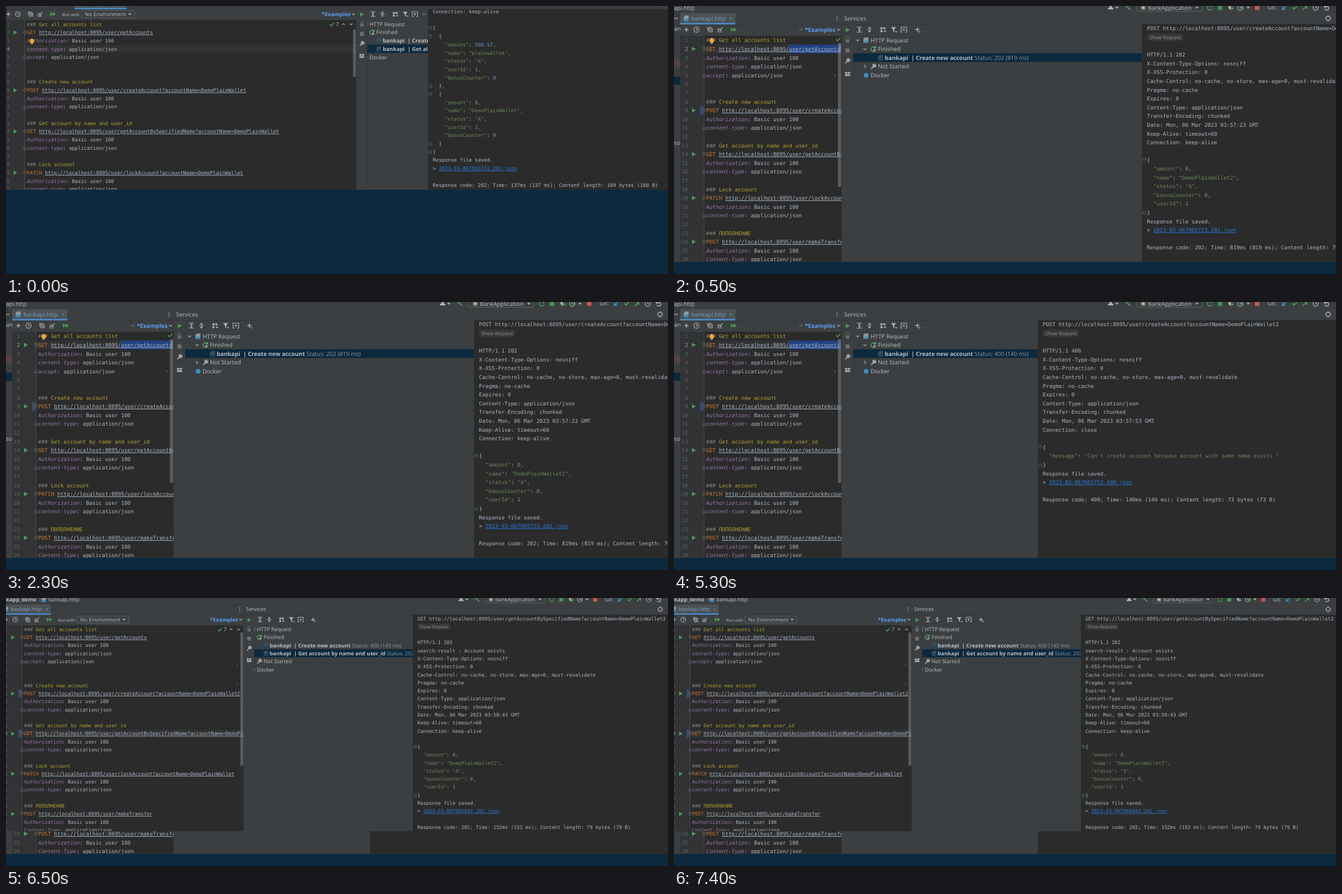
Recreate the animation shown at these times as an HTML page. Size 1175 by 477 pixels, loop 8000 ms.

```html
<!DOCTYPE html>
<html lang="en">
<head>
<meta charset="utf-8">
<style>
html, body { margin: 0; width: 100%; height: 100%; overflow: hidden; background: #0c293e; }
#stage { display: block; width: 1175px; height: 477px; }
text { white-space: pre; text-rendering: geometricPrecision; }
.m { font: 9.42px "DejaVu Sans Mono", monospace; }
.u { font: 10.25px "Open Sans", sans-serif; }
.b { font-weight: 700; }
.l { text-decoration: underline; text-underline-offset: 1.3px; }
</style>
</head>
<body>
<svg id="stage" viewBox="0 0 1175 477"></svg>
<script>
const W = 1175, ROW = 15.6;
const C = {
  bg: '#2b2b2b', gutter: '#313335', panel: '#3c3f41', edge: '#323334', navy: '#0c293e',
  text: '#a9b7c6', ui: '#bbbdbf', icon: '#afb1b3', dim: '#6a6d70', green: '#499c54',
  blue: '#4a88c7', orange: '#cc7832', str: '#6a8759', num: '#6897bb', key: '#9876aa',
  title: '#aea52c', link: '#287bde', grey: '#808080'
};

const esc = s => s.replace(/&/g, '&amp;').replace(/</g, '&lt;').replace(/>/g, '&gt;');
const rect = (x, y, w, h, fill, more = '') =>
  `<rect x="${x}" y="${y}" width="${w}" height="${h}" fill="${fill}" ${more}/>`;
const line = (x, y, d, color = C.icon, w = 1.2) =>
  `<path transform="translate(${x} ${y})" d="${d}" fill="none" stroke="${color}" stroke-width="${w}"/>`;
const solid = (x, y, d, color = C.icon) =>
  `<path transform="translate(${x} ${y})" d="${d}" fill="${color}"/>`;
const dot = (x, y, r, fill) => `<circle cx="${x}" cy="${y}" r="${r}" fill="${fill}"/>`;
const ring = (x, y, r, color = C.icon) =>
  `<circle cx="${x}" cy="${y}" r="${r}" fill="none" stroke="${color}" stroke-width="1.2"/>`;
const span = (s, fill, more = '') => `<tspan fill="${fill}" ${more}>${esc(s)}</tspan>`;
const mono = (x, y, body, more = '') =>
  `<text class="m" x="${x}" y="${y + 3.3}" fill="${C.text}" ${more}>${body}</text>`;
const ui = (x, y, s, fill = C.ui, more = '', cls = '') =>
  `<text class="u ${cls}" x="${x}" y="${y + 3.6}" fill="${fill}" ${more}>${esc(s)}</text>`;
const under = 'class="l"';

// A clipped column of the window whose content is in unscaled units
const pane = (o, l, r, dx, body, top = 0) =>
  `<svg x="${l}" y="${top}" width="${r - l}" height="${o.h - top}">` +
  `<g transform="translate(${dx - l} ${o.dy - top}) scale(${o.u})">${body}</g></svg>`;

const D = {
  plus: 'M-3.7 0h7.4M0-3.7v7.4',
  down: 'M-2.6-1.3L0 1.3 2.6-1.3',
  up: 'M-2.6 1.3L0-1.3 2.6 1.3',
  right: 'M-1.3-2.6L1.3 0-1.3 2.6',
  play: 'M-3-4L4 0-3 4z',
  drop: 'M-3-1.5h6L0 2z',
  check: 'M-4 0l3 3 5-6',
  cross: 'M-2-2l4 4M2-2l-4 4',
  wrench: 'M-4 4L1-1M4.2-2.4A2.6 2.6 0 1 1 2-4.4L1.3-1.5z',
  redo: 'M3.5-2.4A4.2 4.2 0 1 0 4.2 1M4-5v3H1',
  more: 'M-3-1.8L-1.2 0-3 1.8M.4-1.8L2.2 0 .4 1.8'
};

const clock = (x, y, c) => ring(x, y, 4.6, c) + line(x, y, 'M0-2.6V.4H2.4', c);
const fileIcon = (x, y, dim) =>
  solid(x, y, 'M-2-5h6v6h-9v-3z', dim ? '#3a4f5f' : '#8d979e') + rect(x - 5, y + 1, 9, 4, dim ? '#234761' : '#3f86b5');
const wrench = (x, y) => line(x, y, D.wrench, C.icon, 1.7);
const fold = (x, y, end) =>
  line(x, y, end ? 'M-2.5 3v-4L0-3l2.5 2v4zM-1.2 .8h2.4' : 'M-2.5-3v4L0 3l2.5-2v-4zM-1.2-.8h2.4', '#66696b', .8);
const bulb = (x, y) => dot(x, y - .8, 4.2, '#f0a732') + rect(x - 1.8, y + 3.2, 3.6, 2, '#a9a9a9');

const host = 'http://localhost:8095/user/';
const auth = 'Authorization: Basic user 100', type = 'content-type: application/json';
const doc = n => [
  '### Get all accounts list', 'GET ' + host + 'getAccounts', auth, type, 'accept: application/json', '', '',
  '### Create new account', `POST ${host}createAccount?accountName=DemoPlainWallet${n}`, auth, type, '',
  '### Get account by name and user_id', `GET ${host}getAccountBySpecifiedName?accountName=DemoPlainWallet${n}`, auth, type, '',
  '### Lock account', `PATCH ${host}lockAccount?accountName=DemoPlainWallet`, auth, type, '',
  '### ПОПОЛНЕНИЕ', `POST ${host}makeTransfer`, auth, 'Content-Type: application/json'
];

function paint(s) {
  if (s.startsWith('###')) return span('### ', C.grey) + span(s.slice(4), C.title);
  const [head, ...rest] = s.split(' ');
  const tail = rest.join(' ');
  if (tail.startsWith('http')) return span(head + ' ', C.orange) + span(tail, C.text, under);
  return span(head.slice(0, -1), C.key, 'font-style="italic"') + span(head.slice(-1) + ' ' + tail, C.text);
}

function editor(o) {
  const R = (o.right - o.edx) / o.u, end = R + 2, narrow = R < 300;
  let s = rect(11, 53, end, 500, C.bg) + rect(11, 53, 42, 500, C.gutter);
  s += rect(53, 61 + ROW * (o.caret - 1) - 7.8, end, ROW, '#323232');
  s += rect(52.8, 53, .9, 500, '#4d4f51');
  (o.marks || []).forEach(n => s += rect(46, 61 + ROW * (n - 1) - 7.8, 6.5, ROW, '#3a4a66'));
  if (narrow) s += rect(204, 68.6, 92, ROW, '#214283');
  doc(o.suffix).forEach((t, i) => {
    const y = 61 + ROW * i, req = /^[A-Z]+ http/.test(t);
    s += mono(25, y, i + 1, `text-anchor="end" style="fill:${i + 1 === o.caret ? '#a4a3a3' : '#606366'}"`);
    if (!t) return;
    s += mono(57, y, paint(t));
    if (req) s += solid(35, y, D.play, C.green);
    if (req || [5, 11, 16, 21].includes(i + 1)) s += fold(53.2, y, !req);
  });
  if (o.bulb) s += bulb(...o.bulb);
  if (o.cursor) s += rect(294, 69, 1.3, 14.5, '#bbbbbb');
  s += rect(R - 6.5, o.bar[0], 5.8, o.bar[1], '#8a8c8e', 'opacity=".5"');
  (o.ticks || []).forEach(y => s += rect(R - 12.5, y - 1.5, 1, 3, '#85888a'));
  if (narrow) s += line(R - 6, 59, D.check, C.green, 1.6);
  else s += line(R - 46.5, 61.5, D.check, C.green, 1.7) + ui(R - 39, 61, '7', C.ui) +
    line(R - 24.5, 61, D.up) + line(R - 10, 61, D.down);

  // Toolbar above the code
  s += rect(11, 33, end, 20, C.panel) + line(22, 42, D.plus, C.icon, 1.5) + clock(40, 42) +
    line(64, 42, 'M-4 2v-6h6M-2-2h6v6h-6zM0 0h2.6M0 2h2.6') +
    line(82, 42, 'M4.5-4L-1 1.5M-1-2.5v4h4M-3.8-2v6h7') +
    solid(106, 42, 'M-5-4L0 0-5 4zM0-4L5.5 0 0 4z', C.green);
  if (narrow) s += line(R - 72, 42, D.more, C.dim);
  else s += ui(123.5, 42, 'Run with:', C.ui, 'style="font-size:7.8px"') +
    rect(160, 35, 100, 14, C.panel, 'stroke="#646769" stroke-width=".9" rx="1"') +
    ui(166, 42, 'No Environment', C.ui) + solid(251, 42, D.drop);
  s += ui(R - 11, 42, '*Examples', '#589df6', 'text-anchor="end"', 'b') + line(R - 5.5, 42, D.down);

  // Tabs and path
  s += rect(-40, 11.5, end + 40, .9, C.edge) + rect(11, 32.4, end, .8, C.edge);
  const t = o.tab;
  if (t) s += ui(50, 22, 'BankApplication');
  s += rect(11 + t, 12.5, 98, 20, '#4b5257') + rect(11 + t, 30, 98, 2.8, C.blue) +
    fileIcon(22 + t, 22) + ui(31 + t, 22, 'bankapi.http', '#7f9fbd') + line(101 + t, 22, D.cross, '#8b8e90', .9);
  [-3.4, 0, 3.4].forEach(d => s += dot(R - 8, 22 + d, .9, C.icon));
  const c = o.crumb;
  s += ui(c, 3, 'bankapi.http') + fileIcon(c - 8, 3) + line(c - 16, 3, D.right, C.grey) +
    ui(c - 23, 3, 'bankapp_demo', C.ui, 'text-anchor="end"', 'b');

  // Sliver of the project tree
  s += rect(0, 12.5, 11, 500, C.panel) + rect(0, 21.5, 6, 1.2, C.icon) + ui(0, 40, 'an') +
    rect(0, 95, 11, 14, '#54433c') + rect(0, 125.5, 11, 15, C.navy) + ui(0, 243, 'so');
  return s + rect(R - .6, 33, .8, 500, C.edge);
}

function services(o) {
  let s = rect(297, 32, 900, .9, C.edge) + rect(318, 52, .8, 500, C.edge) + ui(302, 22, 'Services');
  s += solid(308, 42.5, D.play, C.green) +
    line(329, 42, 'M-4.5-4.5h9M-4.5 4.5h9M0-3v6M-2-1.2L0-3 2-1.2M-2 1.2L0 3 2 1.2') +
    line(347, 42, 'M-4.5 0h9M0-5v3M-2-3.5L0-1.8 2-3.5M0 5V2M-2 3.5L0 1.8 2 3.5') +
    solid(371, 42, 'M-4.5-4h3.6v3.6h-3.6zM.6-4h3.6v3.6H.6zM-4.5 1h3.6v3.6h-3.6zM1 2h5L3.5 5z') +
    solid(390, 42, 'M-5-4.5h9L1 0v4.5l-2-1V0zM2 3h4.4L4.2 5.4z') +
    line(408, 42, 'M-2 4.5h-3v-9h10v9H2M0-2.5v5M-2.5 0h5') +
    (o.cut ? line(426, 42, D.more, C.icon, 1) : line(432, 42, D.plus, C.icon, 1.5) + solid(435.5, 46, 'M-2-1h4L0 1.4z'));
  s += rect(305, 59.5, 6, 5.5, C.dim) + line(308, 59, 'M-2 0v-2a2 2 0 0 1 4 0v2', C.dim) +
    rect(304.3, 75.5, 7.4, 7.4, C.dim) + wrench(308, 98) +
    solid(308, 121, 'M-4.5-3.6h4v3.2h-4zM.5-3.6h4v3.2h-4zM-4.5.6h9v3h-9z');
  return s;
}

function tree(o) {
  let y = 61, s = '';
  const next = () => (y += ROW);
  s += line(326, y, D.down) + fileIcon(341, y) + ui(349, y, 'HTTP Request');
  next();
  s += line(339, y, D.down) + line(354, y, D.redo, '#59a869', 1.5) + dot(355.5, y + 1.5, 1.6, C.icon) + ui(362, y, 'Finished');
  o.runs.forEach(([name, status], i) => {
    next();
    if (i === o.runs.length - 1) s += rect(318, y - 8.2, 900, ROW, C.navy);
    s += fileIcon(367, y, true) +
      `<text class="u" x="374" y="${y + 3.6}" fill="${C.ui}"><tspan class="b">bankapi  | ${name}</tspan>` +
      span(' ' + status, '#8f979d') + '</text>';
  });
  if (!o.cut) {
    next();
    s += line(339, y, D.right) + wrench(354, y) + ui(362, y, 'Not Started');
  }
  next();
  return s + dot(341, y, 4.2, '#3a8fc8') + ui(349, y, 'Docker');
}

const tint = s => s.replace(/"[^"]*"|[\d.]+|[,:]|[^",:\d]+/g, t =>
  span(t, t[0] === '"' ? C.str : /\d/.test(t) ? C.num : t === ',' ? C.orange : C.text));

function consoleOut(o) {
  let s = rect(0, 32.5, 900, 500, C.bg);
  o.out.forEach((t, i) => {
    const y = o.outY + ROW * i;
    if (t === 'TAG') {
      s += rect(0, y - 6.2, 64, 12.4, '#36383a', 'rx="3" transform="translate(9)"') +
        ui(13.5, y - .4, 'Show Request', '#8c8f91', 'style="font-size:8.5px"');
    } else if (t.startsWith('> ')) {
      s += mono(9, y, span('> ', C.text) + span(t.slice(2), C.link, under));
    } else if (/^\s*(["{}[\]])/.test(t)) {
      s += mono(9, y, tint(t));
      if (!t.includes('"')) s += fold(4.6, y, /[}\]]/.test(t));
    } else s += mono(9, y, esc(t));
  });
  return s;
}

function topBar() {
  const g = C.green;
  return dot(775, 0, 2.4, C.icon) + solid(775, 6, 'M-5 0q0-4 5-4t5 4z') + solid(786, 3, D.drop) +
    line(806, 2, 'M-4-3L4 5M-5-1L0-5', g, 2.2) +
    rect(821, -6, 116, 15.5, C.panel, 'stroke="#646769" stroke-width=".9" rx="2"') +
    dot(833, 3, 4.5, '#6f8a6f') + solid(833, 3, 'M-1.5-2.2L2 0-1.5 2.2z', '#d0d6d0') +
    ui(841, 3, 'BankApplication') + solid(928, 3, D.drop) +
    line(951, 3, D.redo, g, 1.5) +
    solid(969, 3, 'M-3-2q3-4 6 0v4q-3 4-6 0z', g) + line(969, 3, 'M-5-3l2 1M5-3l-2 1M-5 1h10M-4 5l2-2M4 5L2 3', g) +
    solid(988, 3, 'M-4-4h4v8q-4-2-4-5z') + solid(990, 4, 'M-1.5-3.5L4 0l-5.5 3.5z', g) +
    clock(1005, 3) + solid(1008, 4, 'M-1-3L4 0-1 3z', g) + solid(1019, 3, D.drop) +
    rect(1031, -1, 8, 8, '#c75450') + ui(1053.5, 2.5, 'Git:') +
    line(1083, 3, 'M4-4L-3 3M-3-2v5h5', '#3592c4', 1.8) + line(1102, 2.5, D.check, g, 1.9) +
    line(1120, 3, 'M-4 4L3-3M-2-3h5v5', g, 1.8) + clock(1139, 3) +
    line(1158, 3, 'M-1-5L-4-2l3 3M-4-2H1a3 3 0 0 1 0 6h-4', C.icon, 1.4) +
    ring(1161, 22, 4.2) + line(1161, 22, 'M-5 0h3M2 0h3M0-5v3M0 2v3');
}

const windowView = o =>
  rect(0, 0, W, o.h, C.panel) +
  pane(o, 0, W, o.topDx, topBar()) +
  pane(o, o.right, W, o.sdx, services(o)) +
  pane(o, 318 * o.u + o.sdx, o.split, o.sdx - o.shift * o.u, tree(o)) +
  pane(o, o.split, W, o.split, consoleOut(o)) +
  pane(o, 0, o.right, o.edx, editor(o));

const reply = (req, code, date, extra, tail, body, stamp, info) => [
  req, 'TAG', '', 'HTTP/1.1 ' + code, ...extra,
  'X-Content-Type-Options: nosniff', 'X-XSS-Protection: 0',
  'Cache-Control: no-cache, no-store, max-age=0, must-revalidate', 'Pragma: no-cache', 'Expires: 0',
  'Content-Type: application/json', 'Transfer-Encoding: chunked', `Date: Mon, 06 Mar 2023 ${date} GMT`,
  ...tail, '', '{', ...body, '}', ...saved(stamp, code, info)
];
const saved = (stamp, code, [ms, size]) => [
  'Response file saved.', `> 2023-03-06T${stamp}.${code}.json`, '',
  `Response code: ${code}; Time: ${ms}ms (${ms} ms); Content length: ${size} bytes (${size} B)`
];
const alive = ['Keep-Alive: timeout=60', 'Connection: keep-alive'];
const account = ['  "amount": 0,', '  "name": "DemoPlainWallet2",', '  "status": "A",', '  "bonusCounter": 0,', '  "userId": 1'];
const item = (amount, name) => ['  {', `    "amount": ${amount},`, `    "name": "${name}",`,
  '    "status": "A",', '    "userId": 1,', '    "bonusCounter": 0'];
const post = doc('2')[8], get = doc('2')[13];

const list = {
  u: .9414, dy: -25, h: 327, topDx: 70, edx: -16.6, right: 622, sdx: 341.6, shift: 26.6, split: 749,
  suffix: '', caret: 4, bulb: [66.5, 93.5], bar: [71, 89.5], tab: 136, crumb: 104, cut: true,
  runs: [['Create new account', ''], ['Get all accounts list', '']], outY: 37.2,
  out: ['Connection: keep-alive', '', '[', ...item('500.57', 'plainwallet'), '  },',
    ...item('0', 'DemoPlainWallet'), '  }', ']', ...saved('065333', 202, [137, 160])]
};
const created = {
  u: 1, dy: 0, h: 455.5, topDx: 0, edx: 0, right: 297.5, sdx: 0, shift: 0, split: 830.5,
  suffix: '2', caret: 2, marks: [9], bulb: [67, 62], cursor: true, bar: [66, 256], ticks: [123], tab: 0, crumb: -24,
  runs: [['Create new account', 'Status: 202 (819 ms)']], outY: 40,
  out: reply(post, 202, '03:57:23', [], alive, account, '065723', [819, 79])
};
const refused = {
  ...created, cursor: false, split: 645.5, runs: [['Create new account', 'Status: 400 (140 ms)']],
  out: reply(post, 400, '03:57:53', [], ['Connection: close'],
    ['  "message": "Can\'t create account because account with same name exists."'], '065753', [140, 73])
};
const found = {
  u: .9153, dy: 0, h: 415, topDx: 98.5, edx: -20.2, right: 422, sdx: 149.6, shift: 26, split: 722,
  suffix: '2', caret: 14, marks: [9, 14], bar: [67, 259], ticks: [129, 166], tab: 0, crumb: 104,
  runs: [['Create new account', 'Status: 400 (140 ms)'], ['Get account by name and user_id', 'Status: 202 (152 ms)']], outY: 40,
  out: reply(get, 202, '03:58:43', ['search-result : Account exists'], alive, account, '065843', [152, 79])
};

// The last window is shorter and leaves the foot of the previous one in view
const scenes = [
  [0, windowView(list)],
  [500, windowView(created)],
  [3500, windowView(refused)],
  [6500, windowView(refused) + windowView(found)]
];
const stage = document.getElementById('stage');
let shown = -1;

function draw(now) {
  const t = now % 8000;
  const i = scenes.filter(([start]) => t >= start).length - 1;
  if (i !== shown) stage.innerHTML = scenes[shown = i][1];
}
function loop() {
  draw(performance.now());
  requestAnimationFrame(loop);
}
loop();
</script>
</body>
</html>
```
